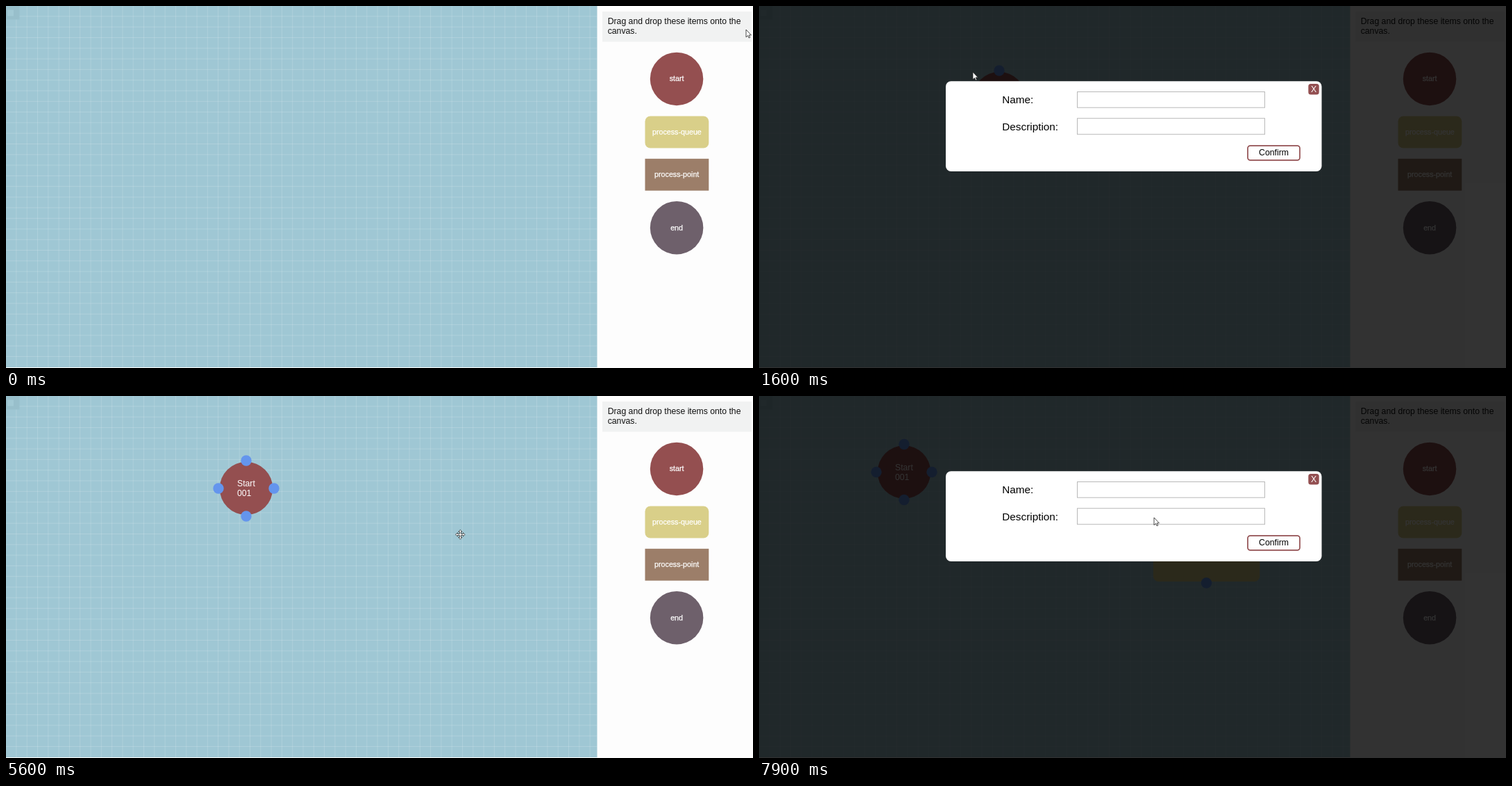
These frames come from a looping animation (1076 px wide and 521 px high, 8000 ms). An HTML page:

```html
<!DOCTYPE html>
<html lang="en">
<head>
<meta charset="utf-8">
<title>Drag and drop flow editor</title>
<style>
  html, body { margin: 0; width: 100%; height: 100%; overflow: hidden; background: #fdfdfd; }
  svg { display: block; width: 1076px; height: 521px; }
  text { font-family: "Liberation Sans", Arial, sans-serif; font-size: 12.24px; }
  .item text { font-size: 10.71px; fill: #fff; stroke: #fff; stroke-width: .25; text-anchor: middle; }
  .label { font-size: 15.3px; }
  .typed { font-size: 10.2px; }
  .field { fill: #fff; stroke: #b9b9b9; }
  .field.focus { stroke: #5b93ea; stroke-width: 1.4; }
  .dot { fill: #6495ed; }
  #cursors g { fill: #fff; stroke: #222; stroke-width: .8; stroke-linejoin: round; }
</style>
</head>
<body>
<svg viewBox="0 0 1076 521">
  <defs>
    <g id="startItem" class="item">
      <circle cx="38.25" cy="38.25" r="38.25" fill="#944f50"/>
      <text x="38.25" y="41.5">start</text>
    </g>
    <g id="queueItem" class="item">
      <rect width="91.8" height="45.9" rx="7.6" fill="#d9cf89"/>
      <text x="45.9" y="26.3">process-queue</text>
    </g>
  </defs>

  <rect width="1076" height="521" fill="#fdfdfd"/>
  <rect width="851.5" height="520" fill="#9fc7d4"/>
  <path id="grid" stroke="#fff" stroke-width=".765" stroke-opacity=".22"/>
  <rect width="19.5" height="19.5" fill="#98bfcb"/>
  <rect x="2" y="5.5" width="9" height="9" fill="#a2c9d4"/>

  <rect x="859" y="8" width="215" height="43.5" fill="#f1f2f2"/>
  <text x="866.7" y="26" fill="#111">Drag and drop these items onto the</text>
  <text x="866.7" y="40.2" fill="#111">canvas.</text>
  <use href="#startItem" x="927.8" y="66.7"/>
  <use href="#queueItem" x="920.5" y="158.6"/>
  <g class="item">
    <rect x="920.5" y="219.8" width="91.8" height="45.9" fill="#9c7e69"/>
    <text x="966.2" y="246">process-point</text>
    <circle cx="966.1" cy="319.2" r="38.25" fill="#6e606b"/>
    <text x="966.1" y="322.6">end</text>
  </g>

  <g id="startNode">
    <circle r="38.25" fill="#944f50"/>
    <circle class="dot" cy="-40" r="7.7"/><circle class="dot" cy="40" r="7.7"/>
    <circle class="dot" cx="-40" r="7.7"/><circle class="dot" cx="40" r="7.7"/>
    <g id="nodeText" fill="#fff"><text x="-13" y="-3">Start</text><text x="-13" y="11">001</text></g>
  </g>
  <g id="queueNode">
    <rect x="567.8" y="190" width="153.5" height="77" rx="7.6" fill="#d9cf89"/>
    <circle class="dot" cx="644.5" cy="269" r="7.7"/>
  </g>

  <g id="startGhost" opacity=".75"><rect width="76.5" height="77" fill="#fff"/><use href="#startItem" y=".8"/></g>
  <g id="queueGhost" opacity=".75"><rect width="91.8" height="45.9" fill="#fff"/><use href="#queueItem"/></g>

  <g id="modal">
    <rect width="1076" height="521" fill-opacity=".8"/>
    <rect x="269" y="108.3" width="541.5" height="129.8" rx="7.6" fill="#fff"/>
    <rect x="791.3" y="112" width="15.4" height="15.4" rx="3.5" fill="#934f51"/>
    <text x="799" y="124" fill="#fff" text-anchor="middle">X</text>
    <text class="label" x="350.3" y="140.3">Name:</text>
    <text class="label" x="350.3" y="178.6">Description:</text>
    <rect id="nameField" class="field" x="458.5" y="123.5" width="270" height="22.7"/>
    <rect id="infoField" class="field" x="458.5" y="161.7" width="270" height="23"/>
    <text id="nameText" class="typed" x="460.3" y="138.4"></text>
    <text id="infoText" class="typed" x="460.3" y="176.7"></text>
    <rect id="caret" width=".9" height="11.5"/>
    <rect x="704" y="201.2" width="75" height="20.6" rx="3.5" fill="#fff" stroke="#934f51" stroke-width="1.7"/>
    <text x="741.5" y="215.4" text-anchor="middle">Confirm</text>
  </g>

  <g id="cursors">
    <g id="arrow"><path d="M0 0V10.8L2.5 8.5 4.1 12 5.7 11.3 4.2 7.9H7.4Z"/></g>
    <g id="beam"><path fill="none" d="M-2.5-5.5H2.5M-2.5 5.5H2.5M0-5.5V5.5"/></g>
    <g id="hand"><path d="M-1.3 8V.9Q0-1 1.2.9V4.8Q2.4 3.9 3.2 5.1 4.4 4.4 5.1 5.7 6.6 5.3 6.8 7V10L5.6 13.4H-.3L-3.8 8.8Z"/></g>
    <g id="move"><path d="M0-6.8L2.6-4H1V-1H4V-2.6L6.8 0 4 2.6V1H1V4H2.6L0 6.8-2.6 4H-1V1H-4V2.6L-6.8 0-4-2.6V-1H-1V-4H-2.6Z"/></g>
  </g>
</svg>
<script>
const $ = id => document.getElementById(id);
const show = (id, on) => { $(id).style.display = on ? '' : 'none'; };
const place = (id, x, y) => $(id).setAttribute('transform', `translate(${x} ${y})`);
const clamp = (v, lo, hi) => Math.min(hi, Math.max(lo, v));

const CELL = 15.3;
let lines = '';
for (let x = CELL; x < 851; x += CELL) lines += `M${x - .4} 0V520`;
for (let y = CELL; y < 520; y += CELL) lines += `M0 ${y - .4}H851.5`;
$('grid').setAttribute('d', lines);

// Each move glides the pointer from where it rests to a new spot.
const home = [1066, 34];
const moves = [
  { from: 0, to: 400, spot: [964, 88] },       // grab the start item
  { from: 400, to: 900, spot: [724, 95] },
  { from: 1100, to: 1500, spot: [308, 95] },   // drop it
  { from: 1800, to: 2400, spot: [501, 138.5] },
  { from: 4400, to: 4500, spot: [584, 173] },
  { from: 4900, to: 5400, spot: [733, 216] },  // confirm
  { from: 5500, to: 6000, spot: [340, 133] },  // grab the node
  { from: 6000, to: 6300, spot: [203, 109.5] },
  { from: 6300, to: 6600, spot: [641, 145] },
  { from: 6700, to: 7100, spot: [931, 176] },  // grab the queue item
  { from: 7100, to: 7600, spot: [569, 175] }
];

function pointer(t) {
  let [x, y] = home;
  for (const { from, to, spot } of moves) {
    const k = clamp((t - from) / (to - from), 0, 1);
    x += (spot[0] - x) * k;
    y += (spot[1] - y) * k;
  }
  return [x, y];
}

// Part of the text typed by time t, one key per step
const typed = (text, start, step, t) => text.slice(0, clamp(Math.floor((t - start) / step) + 1, 0, text.length));

function cursorKind(t, x, y, open) {
  if (open) {
    const inField = x > 458 && x < 729 && (y > 123 && y < 147 || y > 161 && y < 185);
    return inField ? 'beam' : x > 703 && y > 200 ? 'hand' : 'arrow';
  }
  return t >= 5600 && t < 7100 && x < 851 ? 'move' : 'arrow';
}

function draw(now) {
  const t = Math.floor(now % 8000 / 100) * 100;
  const [x, y] = pointer(t);
  const open = t >= 1600 && t < 5600;
  const kind = cursorKind(t, x, y, open);
  for (const k of ['arrow', 'beam', 'hand', 'move']) show(k, k === kind);
  place('cursors', x, y);

  show('startGhost', t >= 500 && t < 1600);
  place('startGhost', x - 36.2, y - 21);
  show('queueGhost', t >= 7200 && t < 7700);
  place('queueGhost', x - 10, y - 17);

  const [gripX, gripY] = pointer(clamp(t, 6000, 6300));
  show('startNode', t >= 1600);
  place('startNode', gripX + 6, gripY);
  show('nodeText', t >= 5600);
  show('queueNode', t >= 7900);

  show('modal', open || t >= 7900);
  const onName = open && t >= 2400 && t < 3700, onInfo = open && t >= 3700;
  $('nameField').classList.toggle('focus', onName);
  $('infoField').classList.toggle('focus', onInfo);
  $('nameText').textContent = open ? typed('Start', 2900, 125, t) : '';
  $('infoText').textContent = open ? typed('001', 4000, 200, t) : '';
  show('caret', onName || onInfo);
  if (onName || onInfo) {
    const text = $(onName ? 'nameText' : 'infoText');
    place('caret', 460.4 + text.getComputedTextLength(), onName ? 129 : 167.2);
  }
}

const begin = performance.now();
function tick() {
  draw(performance.now() - begin);
  requestAnimationFrame(tick);
}
tick();
</script>
</body>
</html>
```
